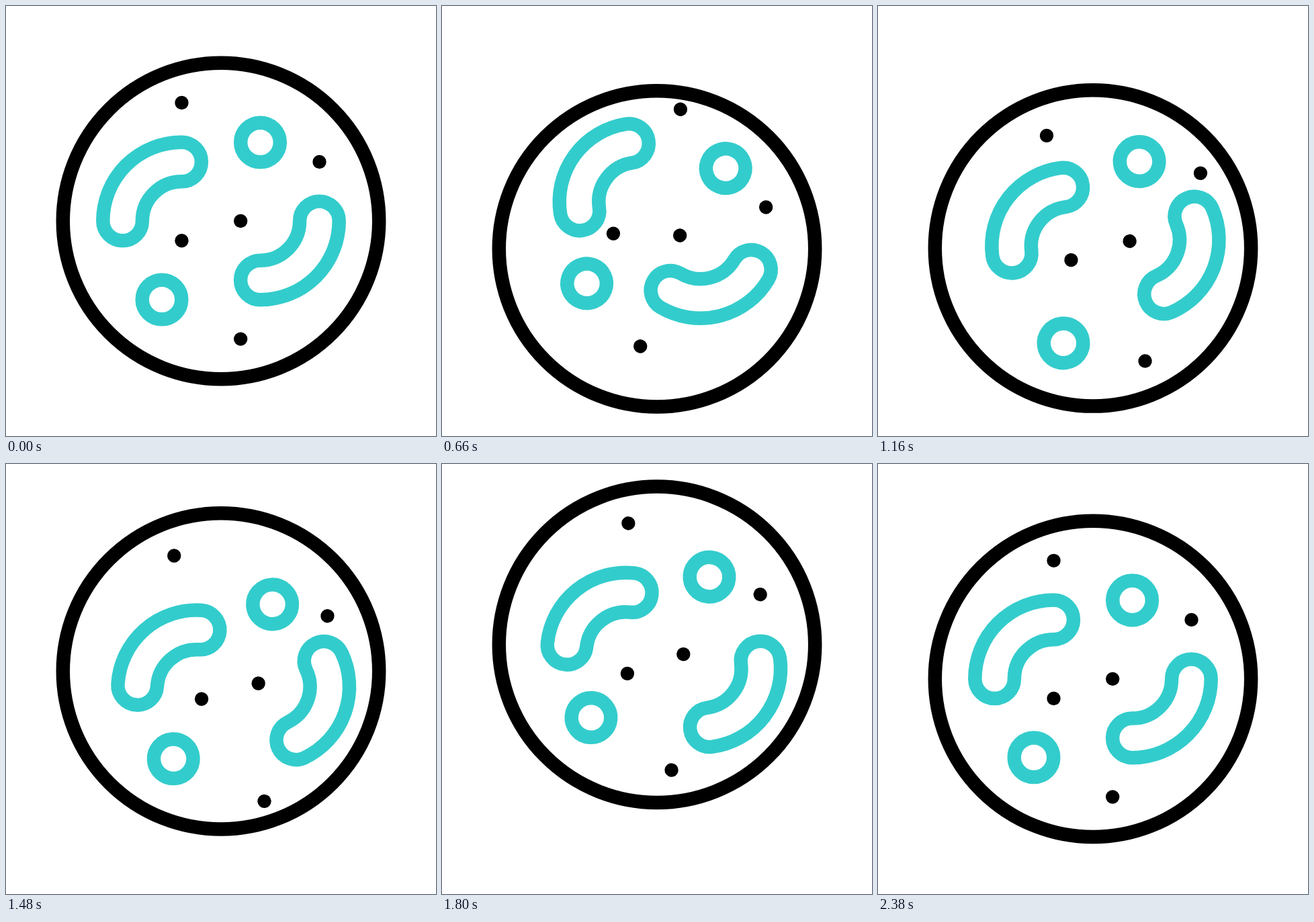
Animation of 640x640 px, one loop 2.4 s. Source, as an HTML page with a canvas:

```html
<!DOCTYPE html>
<html>
<head>
<meta charset="utf-8">
<title>Petri dish</title>
<style>
html, body { margin: 0; height: 100%; overflow: hidden; background: #fff; }
canvas { display: block; }
</style>
</head>
<body>
<canvas id="stage" width="640" height="640"></canvas>
<script>
const ctx = document.getElementById('stage').getContext('2d');
const LOOP = 2400, TEAL = '#33cccc';

// Smooth motion through [time, value] keys, at rest at both ends and at every turning point
function keys(...points) {
  const span = i => points[i + 1][0] - points[i][0];
  const rate = i => (points[i + 1][1] - points[i][1]) / span(i);
  const last = points.length - 1;
  const slopes = points.map((_, i) => {
    if (i === 0 || i === last || rate(i - 1) * rate(i) <= 0) return 0;
    const a = span(i - 1), b = span(i);
    return 3 * (a + b) / ((2 * b + a) / rate(i - 1) + (b + 2 * a) / rate(i));
  });
  return t => {
    let i = 0;
    while (i < last - 1 && t > points[i + 1][0]) i++;
    const u = Math.min(1, (t - points[i][0]) / span(i)), v = 1 - u;
    return points[i][1] * v * v * (1 + 2 * u) + points[i + 1][1] * u * u * (3 - 2 * u)
      + span(i) * u * v * (slopes[i] * v - slopes[i + 1] * u);
  };
}

const dishY = keys([0, 320], [660, 361.3], [965, 376.6], [1480, 308.5], [1800, 268.8], [LOOP, 320]);
const swirl = keys([0, 0], [490, 24.3], [1250, -8.5], [1830, 5.2], [LOOP, 0]);

// The loop most parts drift around: out, over the top, and back home
const route = document.createElementNS('http://www.w3.org/2000/svg', 'path');
route.setAttribute('d',
  'M0 0L-25.3 -15C-22 -25 -8 -31 10 -33C19 -34 26 -15 26.4 -1C27 9 28 20 24 23L0 0');
const routeEnd = route.getTotalLength();
const firstCorner = Math.hypot(25.3, 15), lastCorner = routeEnd - Math.hypot(24, 23);

// Times of reaching the first corner, the last corner and home
function drift(out, over, home) {
  const distance = keys([0, 0], [out, firstCorner], [over, lastCorner], [home, routeEnd]);
  return t => route.getPointAtLength(distance(t));
}

const soloX = keys([0, 0], [320, -12.3], [660, 20.1], [1160, 11.2], [1480, 0]);
const soloY = keys([0, 0], [320, -18.3], [660, -31], [1160, 1.1], [1480, 0]);

const dots = [
  [-58.5, -176, t => ({ x: soloX(t), y: soloY(t) })],
  [146.5, -88, drift(500, 1390, 1780)],
  [29.2, 0, drift(370, 1510, 2250)],
  [-58.5, 29.2, drift(410, 1680, 2350)],
  [29.2, 175.6, drift(370, 1450, 2200)]
];
const rings = [
  [58.5, -117, drift(370, 1490, 2220)],
  [-88, 117, drift(330, 1230, 1760)]
];
const rods = [
  [-102.4, -44, drift(400, 1560, 2350), keys([0, 0], [640, -29], [1380, 8], [1940, 0])],
  [102.4, 44, drift(415, 1710, 2380), keys([0, 180], [620, 190.8], [1370, 157.2], [2300, 180])]
];

const radians = degrees => degrees * Math.PI / 180;

function circle(r) {
  ctx.beginPath();
  ctx.arc(0, 0, r, 0, 2 * Math.PI);
}

function rod() {
  const P = Math.PI, c = 44, cap = 29.3;
  ctx.beginPath();
  ctx.arc(c, c, 2 * c + cap, P, 1.5 * P);
  ctx.arc(c, -c, cap, -P / 2, P / 2);
  ctx.arc(c, c, 2 * c - cap, 1.5 * P, P, true);
  ctx.arc(-c, c, cap, 0, P);
  ctx.closePath();
}

function place(parts, t, paint) {
  for (const [x, y, move, turn] of parts) {
    const offset = move(t);
    ctx.save();
    ctx.translate(x + offset.x, y + offset.y);
    if (turn) ctx.rotate(radians(turn(t)));
    paint();
    ctx.restore();
  }
}

function draw(t) {
  ctx.resetTransform();
  ctx.clearRect(0, 0, 640, 640);
  ctx.lineWidth = 20.5;
  ctx.lineJoin = 'round';
  ctx.translate(320, dishY(t));
  ctx.strokeStyle = '#000';
  circle(235.2);
  ctx.stroke();

  ctx.rotate(radians(swirl(t)));
  ctx.strokeStyle = TEAL;
  place(dots, t, () => { circle(10.2); ctx.fill(); });
  place(rings, t, () => { circle(29.3); ctx.stroke(); });
  place(rods, t, () => { rod(); ctx.stroke(); });
}

const start = performance.now();
function tick() {
  draw((performance.now() - start) % LOOP);
  requestAnimationFrame(tick);
}
tick();
</script>
</body>
</html>
```
